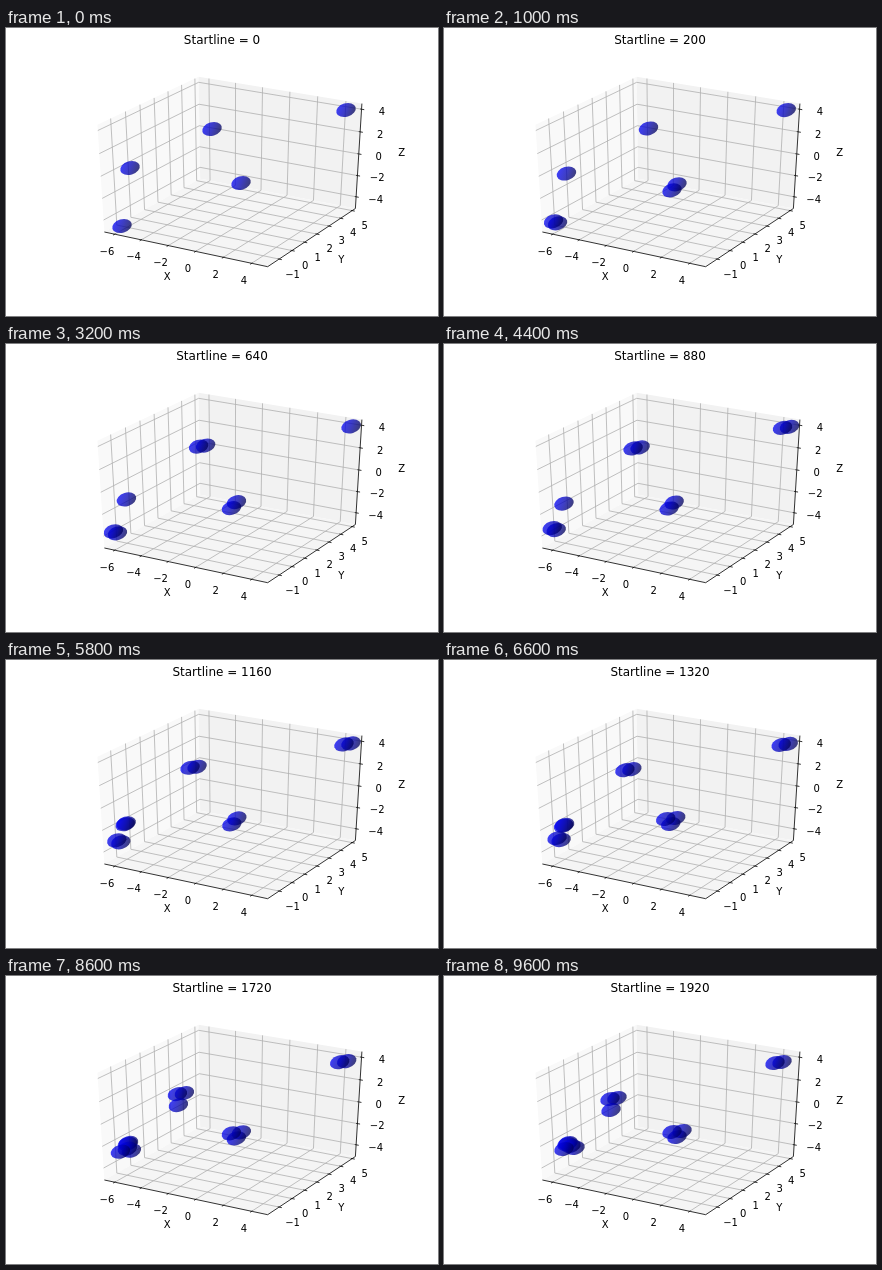
An HTML page with a canvas that plays this animation: 432x288 px, repeating every 9800 ms.

```html
<!DOCTYPE html>
<html lang="en">
<head>
<meta charset="utf-8">
<title>Startline</title>
<style>
html, body { margin: 0; width: 100%; height: 100%; overflow: hidden; background: #fff; }
canvas { display: block; }
</style>
</head>
<body>
<canvas id="stage" width="432" height="288"></canvas>
<script>
const ctx = document.getElementById('stage').getContext('2d');
const STEP = 200, STEPS = 49;
const E = 0.5 + 1 / 48; // half size of the box, in axis units
const TICK = 1 / 12;

// Perspective view of the unit box: elevation 30, azimuth -60, distance 10
function project([x, y, z]) {
  const depth = 10 - (0.433 * x - 0.75 * y + 0.5 * z);
  return [
    225.9 + 1809.7 * (0.866 * x + 0.5 * y) / depth,
    140.4 - 1175 * (-0.25 * x + 0.433 * y + 0.866 * z) / depth
  ];
}

const move = (p, dir, d) => p.map((v, i) => v + dir[i] * d);

// path: one grid line, starting at the visible axis edge
const AXES = [
  { name: 'X', min: -6.55, max: 4.88, spacing: 2, out: [0, -1, -1], tickDir: [0, -1, 0],
    path: v => [[v, -E, -E], [v, E, -E], [v, E, E]] },
  { name: 'Y', min: -1.73, max: 5.14, spacing: 1, out: [1, 0, -1], tickDir: [1, 0, 0],
    path: v => [[E, v, -E], [-E, v, -E], [-E, v, E]] },
  { name: 'Z', min: -4.93, max: 4.3, spacing: 2, out: [1, 1, 0], tickDir: [1, 0, 0],
    path: v => [[E, E, v], [-E, E, v], [-E, -E, v]] }
];

const PANES = [
  ['#f9f9f9', (a, b) => [-E, a, b]],
  ['#f2f2f2', (a, b) => [a, E, b]],
  ['#f5f5f5', (a, b) => [a, b, -E]]
];

// Each cluster drifts along a quadratic curve; followers are [first step, dx, dy]
const CLUSTERS = [
  { curve: [[206, 101], [200, 97], [173, 122]], followers: [[12, -7, 1], [42, -6, 12]] },
  { curve: [[340, 82], [352, 82], [338, 86]], followers: [[19, -7, 1]] },
  { curve: [[124, 140], [116, 168], [124, 167]], followers: [[25, -1, 1]] },
  { curve: [[235, 155], [224, 162], [238, 155]], followers: [[4, -5, 6], [33, -10, 1]] },
  { curve: [[116, 198], [102, 185], [131, 172]], followers: [[4, -4, -2], [36, -11, 1]] }
];

function trace(points) {
  ctx.beginPath();
  points.forEach(p => ctx.lineTo(...project(p)));
}

function line(points, color) {
  trace(points);
  ctx.strokeStyle = color;
  ctx.lineWidth = 0.8;
  ctx.stroke();
}

function text(str, x, y, size = 10) {
  ctx.font = `${size}px "DejaVu Sans", sans-serif`;
  ctx.textAlign = 'center';
  ctx.fillStyle = '#000';
  ctx.fillText(str, x, y);
}

function drawAxis({ name, min, max, spacing, out, tickDir, path }) {
  const unit = v => (v - min) / (max - min) - 0.5;
  line([path(-E)[0], path(E)[0]], '#000');
  for (let v = Math.ceil(min / spacing) * spacing; v <= max; v += spacing) {
    const points = path(unit(v)), edge = points[0];
    line(points, '#b0b0b0');
    line([move(edge, tickDir, -0.1 * TICK), move(edge, tickDir, 0.2 * TICK)], '#000');
    const [x, y] = project(move(edge, out, 0.0833));
    text(String(v + 0).replace('-', '\u2212'), x, y + 7.6);
  }
  const [x, y] = project(move(path(0)[0], out, 0.181));
  text(name, x, y + 2.75);
}

const shade = ctx.createLinearGradient(-8.2, -3.1, 8.2, 3.1);
shade.addColorStop(0, 'rgba(0,0,247,.75)');
shade.addColorStop(0.5, 'rgba(0,0,178,.75)');
shade.addColorStop(1, 'rgba(0,0,84,.75)');

function drawBall(x, y) {
  ctx.save();
  ctx.translate(x, y);
  ctx.beginPath();
  ctx.ellipse(0, 0, 10, 6.75, -0.293, 0, 2 * Math.PI);
  ctx.fillStyle = shade;
  ctx.fill();
  ctx.restore();
}

function drawCluster({ curve: [from, bend, to], followers }, step) {
  const s = step / (STEPS - 1), r = 1 - s;
  const [x, y] = from.map((v, i) => r * r * v + 2 * r * s * bend[i] + s * s * to[i]);
  drawBall(x, y);
  for (const [first, dx, dy] of followers) {
    if (step >= first) drawBall(x + dx, y + dy);
  }
}

function draw(step) {
  ctx.fillStyle = '#fff';
  ctx.fillRect(0, 0, 432, 288);
  for (const [color, corner] of PANES) {
    trace([corner(-E, -E), corner(E, -E), corner(E, E), corner(-E, E)]);
    ctx.fillStyle = color;
    ctx.fill();
  }
  AXES.forEach(drawAxis);
  CLUSTERS.forEach(cluster => drawCluster(cluster, step));
  text(`Startline = ${step * 40}`, 216, 16, 12);
}

const start = performance.now();
function tick() {
  draw(Math.floor((performance.now() - start) / STEP) % STEPS);
  requestAnimationFrame(tick);
}
tick();
</script>
</body>
</html>
```
